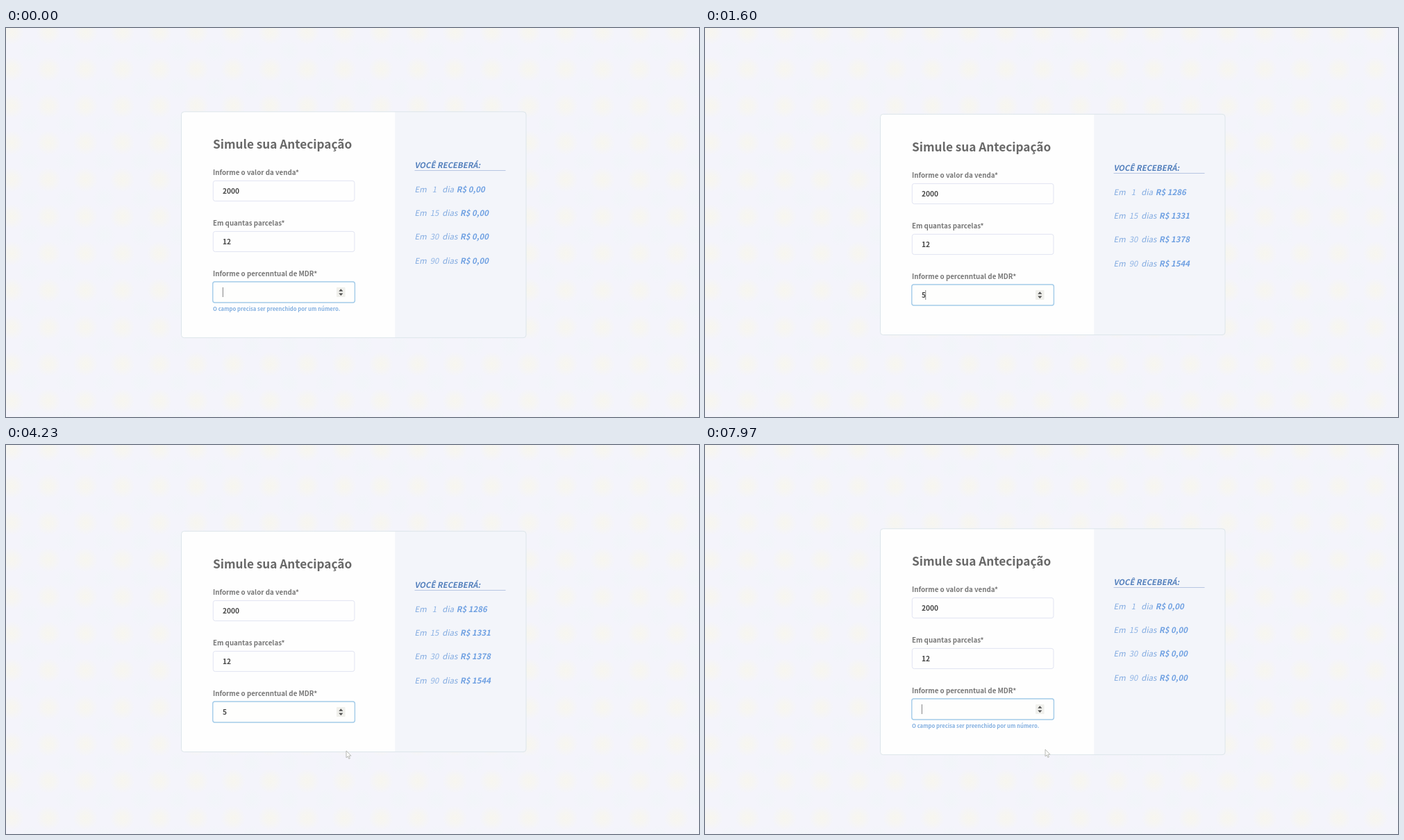
Recreate the animation shown at these times as an HTML page with a canvas. Size 998x561 px, loop 8 s.

```html
<!DOCTYPE html>
<html lang="pt-BR">
<head>
<meta charset="utf-8">
<title>Simule sua Antecipação</title>
<style>
  html, body { margin: 0; width: 100%; height: 100%; overflow: hidden; background: #f4f4fb; }
  canvas { display: block; width: 998px; height: 561px; }
</style>
</head>
<body>
<canvas id="stage"></canvas>
<script>
const W = 998, H = 561, LOOP = 8000;
const TYPED = 515, RESULTS = 800, CLEARED = 4640;
const BLINK = 530;
const FAMILY = '"Noto Sans CJK JP", "Noto Sans CJK SC", "Noto Sans CJK", "Open Sans", sans-serif';
const SLANT = 0.2;

const canvas = document.getElementById('stage');
const ctx = canvas.getContext('2d');
const dpr = window.devicePixelRatio || 1;
canvas.width = Math.round(W * dpr);
canvas.height = Math.round(H * dpr);

const periods = [['1', 'dia', 1286], ['15', 'dias', 1331], ['30', 'dias', 1378], ['90', 'dias', 1544]];

function text(str, x, y, size, color, { weight = 700, italic = false, align = 'left' } = {}) {
  ctx.save();
  ctx.translate(x, y);
  if (italic) ctx.transform(1, 0, -SLANT, 1, 0, 0);
  ctx.font = `${weight} ${size}px ${FAMILY}`;
  ctx.textAlign = align;
  ctx.fillStyle = color;
  ctx.fillText(str, 0, 0);
  ctx.restore();
}

function box(x, y, w, h, r, fill, stroke, line = 1) {
  ctx.beginPath();
  ctx.roundRect(x, y, w, h, r);
  if (fill) { ctx.fillStyle = fill; ctx.fill(); }
  if (stroke) { ctx.strokeStyle = stroke; ctx.lineWidth = line; ctx.stroke(); }
}

function shape(points, fill, stroke) {
  ctx.beginPath();
  points.forEach(([x, y]) => ctx.lineTo(x, y));
  ctx.closePath();
  ctx.fillStyle = fill;
  ctx.fill();
  if (stroke) { ctx.strokeStyle = stroke; ctx.lineWidth = 0.8; ctx.stroke(); }
}

function glow(g, x, y, r, rgb, alpha) {
  const grad = g.createRadialGradient(x, y, 0, x, y, r);
  grad.addColorStop(0, `rgba(${rgb},${alpha})`);
  grad.addColorStop(0.45, `rgba(${rgb},${alpha * 0.7})`);
  grad.addColorStop(1, `rgba(${rgb},0)`);
  g.fillStyle = grad;
  g.fillRect(x - r, y - r, 2 * r, 2 * r);
}

// Soft pastel lattice, painted once
function makeBackdrop() {
  const c = document.createElement('canvas');
  c.width = W;
  c.height = H;
  const g = c.getContext('2d');
  g.fillStyle = '#f4f4fb';
  g.fillRect(0, 0, W, H);
  const step = 53.2;
  for (let y = 6; y < H + step; y += step) {
    for (let x = 8; x < W + step; x += step) {
      glow(g, x, y, 18, '249,247,231', 0.6);
      glow(g, x + step / 2, y + step / 2, 16, '238,247,246', 0.4);
    }
  }
  return c;
}
const backdrop = makeBackdrop();

function drawField(label, value, y, focused) {
  text(label, 298, y - 8.5, 9.75, '#777777');
  if (focused) box(297.8, y, 204.6, 30, 3, '#fefefd', '#a2cbe9', 1.4);
  else box(298.3, y + 0.4, 203.6, 29.2, 3, '#fefefe', '#e1e4f2');
  text(value, 312, y + 18.8, 10.2, '#484848');
}

function drawSpinner(y) {
  box(476, y, 12.5, 14, 1, '#f0f0ec');
  shape([[479.2, y + 5.8], [482.3, y + 2.2], [485.4, y + 5.8]], '#505050');
  shape([[479.2, y + 8.4], [482.3, y + 12], [485.4, y + 8.4]], '#505050');
}

function drawCard(filled, results, caret) {
  const dy = filled ? 4 : 0;
  const top = 120.8 + (filled ? 3.5 : 0);
  const height = filled ? 318.3 : 325.9;

  ctx.save();
  ctx.beginPath();
  ctx.roundRect(252.5, top, 496.5, height, 4);
  ctx.clip();
  ctx.fillStyle = '#fefefe';
  ctx.fillRect(252, top, 308.5, height);
  ctx.fillStyle = '#f3f5fa';
  ctx.fillRect(560.5, top, 189, height);
  ctx.restore();
  box(252.5, top, 496.5, height, 4, null, '#dce5ea');

  ctx.save();
  ctx.translate(0, dy);
  text('Simule sua Antecipação', 298, 174.3, 17.2, '#686868');
  drawField('Informe o valor da venda*', '2000', 220, false);
  drawField('Em quantas parcelas*', '12', 293, false);
  drawField('Informe o percenntual de MDR*', filled ? '5' : '', 366, true);
  drawSpinner(374);
  if (caret) {
    ctx.fillStyle = '#777777';
    ctx.fillRect(filled ? 317.3 : 311.9, 374, 0.9, 14);
  }
  if (!filled) text('O campo precisa ser preenchido por um número.', 298, 407.8, 7.68, '#82afe0');

  text('VOCÊ RECEBERÁ:', 588.5, 201.8, 11.3, '#5480bd', { italic: true });
  ctx.fillStyle = '#b7c5e2';
  ctx.fillRect(588.5, 205, 131, 1);

  periods.forEach(([days, unit, amount], i) => {
    const y = 237.2 + i * 34.1;
    const soft = { weight: 400, italic: true };
    text('Em', 588.5, y, 11.3, '#80aae0', soft);
    text(days, 617, y, 11.3, '#8fb4e5', { ...soft, align: 'center' });
    text(unit, 628.3, y, 11.5, '#80aae0', soft);
    text('R$ ' + (results ? amount : '0,00'), i ? 654 : 648.8, y, 11.4, '#70a1e2', { italic: true });
  });
  ctx.restore();
}

const clamp = v => Math.min(1, Math.max(0, v));
const easeOut = v => 1 - (1 - v) ** 3;

function drawPointer(t) {
  if (t < 3400) return;
  const p = easeOut(clamp((t - 3400) / 700));
  const lift = easeOut(clamp((t - 4250) / 350)) * 2;
  ctx.save();
  ctx.translate(964 + (490 - 964) * p, 380 + 61 * p - lift);
  shape([[0, 0], [0, 10], [2.3, 8], [3.8, 11.6], [5.4, 10.9], [3.9, 7.4], [6.9, 7.2]], '#fafaf8', '#a9aaa5');
  ctx.restore();
}

function caretOn(t) {
  if (t < TYPED) return t < 250;
  const since = t - (t < CLEARED ? TYPED : CLEARED);
  return since % (2 * BLINK) < BLINK;
}

function draw(t) {
  ctx.setTransform(dpr, 0, 0, dpr, 0, 0);
  ctx.drawImage(backdrop, 0, 0, W, H);
  const filled = t >= TYPED && t < CLEARED;
  drawCard(filled, filled && t >= RESULTS, caretOn(t));
  drawPointer(t);
}

const start = performance.now();
function tick() {
  draw((performance.now() - start) % LOOP);
  requestAnimationFrame(tick);
}
tick();
</script>
</body>
</html>
```
